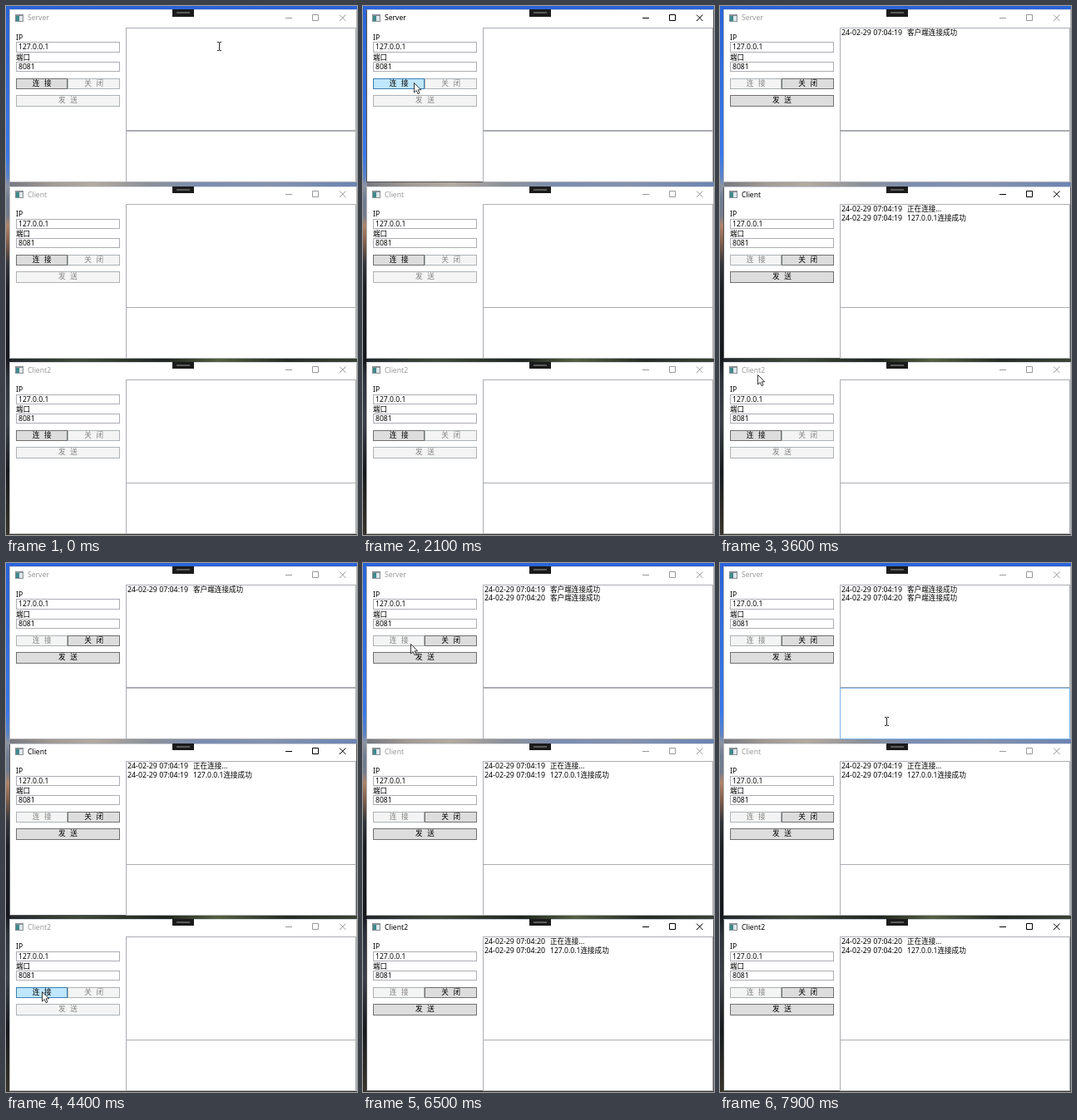
An HTML page for the animation above (8000 ms loop, 422 px wide and 636 px high).

```html
<!DOCTYPE html>
<html lang="zh-CN">
<head>
<meta charset="utf-8">
<style>
html, body { margin: 0; width: 100%; height: 100%; overflow: hidden; }
body {
  position: relative;
  font: 8.6px "Noto Sans", "Noto Sans CJK SC", "Noto Sans CJK", sans-serif;
  color: #000;
  background:
    linear-gradient(90deg, #77787f, #a09a94 12%, #b3aaa0 24%, #8c9098 40%, #7a8cb0 55%, #8392ae 75%, #6c84b2) 5px 211px / 417px 8px no-repeat,
    linear-gradient(90deg, #23282c, #3f4a3a 20%, #20251f 45%, #55603f 60%, #262b24 80%, #3b4336) 5px 423px / 417px 7px no-repeat,
    linear-gradient(#2a63d8, #3a78e8 180px, #5a82c8 205px, #8d93a0 216px, #6f7c92 232px, #747c8c 252px,
      #b08468 264px, #7d5c4a 286px, #33363c 310px, #1c1f24 340px, #15181d 424px, #2c323a 446px, #3a3f48 500px, #16191d 560px, #38342a);
}
body div { position: absolute; box-sizing: border-box; white-space: pre; }
.win { left: 0; width: 422px; height: 212px; }
.frame { background: #fff; border: 1px solid #b4b4b4; border-top-color: #d8dce4; }
.active .frame { border-color: #555; border-top-color: #c4ccd8; }
.title, .caption { color: #999; }
.active .title, .active .caption { color: #000; }
.caption { fill: none; stroke: currentColor; position: absolute; left: 0; top: 0; }
.icon { background: linear-gradient(90deg, #3f8a8c 55%, #dfe6ea 55%); border: 1px solid #8a9096; border-top-width: 2px; }
.handle { background: #1b1b1b; }
.handle::after { content: ""; position: absolute; left: 5px; top: 3px; width: 16px; height: 2px; background: #5a5a5a; }
.text { background: #fff; border: 1px solid #abadb3; }
.field { padding-left: 2px; }
.input.hover { border-color: #7eb4ea; }
.button { text-align: center; word-spacing: 3.4px; background: #f4f4f4; border: 1px solid #adb2b5; color: #838383; }
.enabled { background: #ddd; border-color: #707070; color: #000; }
.enabled.hover { background: #bee6fd; border-color: #3c7fb1; }
.stamp { font-size: 8.8px; }
#cursor { position: absolute; left: 0; top: 0; overflow: visible; pointer-events: none; }
</style>
</head>
<body>
<svg id="cursor" width="1" height="1">
  <path id="arrow" d="M0 0V11.5L2.7 9L4.6 13.2L6.5 12.3L4.7 8.3H8.2Z" fill="#fff" stroke="#222" stroke-width=".9"/>
  <path id="beam" d="M-2.5 -5H-.7L0 -4.5L.7 -5H2.5M0 -4.5V4.5M-2.5 5H-.7L0 4.5L.7 5H2.5" fill="none" stroke="#222"/>
</svg>
<script>
const LOOP = 8000, STEP = 100;
const cursor = document.getElementById('cursor');
const arrow = document.getElementById('arrow');
const beam = document.getElementById('beam');

function box(parent, cls, x, y, w, h, text = '') {
  const el = document.createElement('div');
  el.className = cls;
  el.textContent = text;
  const line = /text|button/.test(cls) ? h - 2 : h;
  el.style.cssText = `left:${x}px;top:${y}px;width:${w}px;height:${h}px;line-height:${line}px`;
  parent.append(el);
  return el;
}

function makeWindow({ name, top, active, connected, log }) {
  const el = box(document.body, 'win', 0, top, 422, 212);
  box(el, 'frame', 4.4, 4.4, 417.6, 207.6);
  box(el, 'icon', 11, 10, 10, 9);
  box(el, 'title', 26, 8.4, 100, 12, name);
  el.insertAdjacentHTML('beforeend', `<svg class="caption" width="422" height="26">
    <path d="M336 14.5H344M368.5 10.5H375.5V17.5H368.5ZM401 10.5L408.5 18M408.5 10.5L401 18"/></svg>`);
  box(el, 'handle', 200, 4.2, 26, 8.8);
  box(el, '', 12, 32, 60, 12, 'IP');
  box(el, 'text field', 12, 43.3, 125, 12.4, '127.0.0.1');
  box(el, '', 12, 55.6, 60, 12, '端口');
  box(el, 'text field', 12, 66.6, 125, 12.4, '8081');
  const connect = box(el, 'button', 12, 86.6, 62.4, 13.4, '连 接');
  const close = box(el, 'button', 74.4, 86.6, 62.6, 13.4, '关 闭');
  const send = box(el, 'button', 12, 107, 125, 13.6, '发 送');
  box(el, 'text', 144, 25.6, 277.4, 124.6);
  box(el, 'text input', 144, 150, 277.4, 62);
  const lines = log.map(([at, stamp, message], i) => {
    const y = 26.7 + i * 10.6;
    return { at, parts: [
      box(el, 'stamp', 146, y, 78, 10, '24-02-29 07:04:' + stamp),
      box(el, '', 225, y, 120, 10, message)
    ] };
  });
  return t => {
    const on = t >= connected;
    el.classList.toggle('active', t >= active[0] && t < active[1]);
    connect.classList.toggle('enabled', !on);
    close.classList.toggle('enabled', on);
    send.classList.toggle('enabled', on);
    for (const { at, parts } of lines)
      for (const p of parts) p.style.visibility = t >= at ? 'visible' : 'hidden';
  };
}

const joined = '客户端连接成功', joining = '正在连接...', success = '127.0.0.1连接成功';
const windows = [
  { name: 'Server', top: 0, active: [2100, 3200], connected: 2300,
    log: [[3300, 19, joined], [4600, 20, joined]] },
  { name: 'Client', top: 212.4, active: [3200, 4500], connected: 3300,
    log: [[3200, 19, joining], [3300, 19, success]] },
  { name: 'Client2', top: 423.4, active: [4500, LOOP], connected: 4600,
    log: [[4500, 20, joining], [4600, 20, success]] }
].map(makeWindow);
document.body.append(cursor);

// Pointer path: time, x, y
const path = [
  [0, 256, 48], [500, 52, 505], [900, 61, 92], [2300, 61, 92], [2900, 52, 295],
  [3000, 51, 303], [3300, 51, 303], [3800, 42, 519], [4000, 43, 515], [4700, 43, 515],
  [5200, 116, 297], [5600, 105, 92], [6100, 105, 525], [6500, 57, 97], [6600, 59, 100],
  [7400, 240, 425], [7500, 235, 445], [7900, 200, 190], [LOOP, 200, 190]
];

function pointer(t) {
  const i = path.findIndex(p => p[0] > t);
  const [t0, x0, y0] = path[i - 1], [t1, x1, y1] = path[i];
  const k = (t - t0) / (t1 - t0), e = k * k * (3 - 2 * k);
  return [x0 + (x1 - x0) * e, y0 + (y1 - y0) * e];
}

function draw(now) {
  const t = Math.floor(now % LOOP / STEP) * STEP;
  windows.forEach(update => update(t));
  const [x, y] = pointer(t);
  const under = document.elementFromPoint(x, y);
  document.querySelectorAll('.hover').forEach(el => el.classList.remove('hover'));
  if (under) under.classList.add('hover');
  const overText = !!under && under.classList.contains('text');
  arrow.style.display = overText ? 'none' : '';
  beam.style.display = overText ? '' : 'none';
  cursor.style.transform = `translate(${Math.round(x) + .5}px, ${Math.round(y) + .5}px)`;
  requestAnimationFrame(draw);
}
requestAnimationFrame(draw);
</script>
</body>
</html>
```
